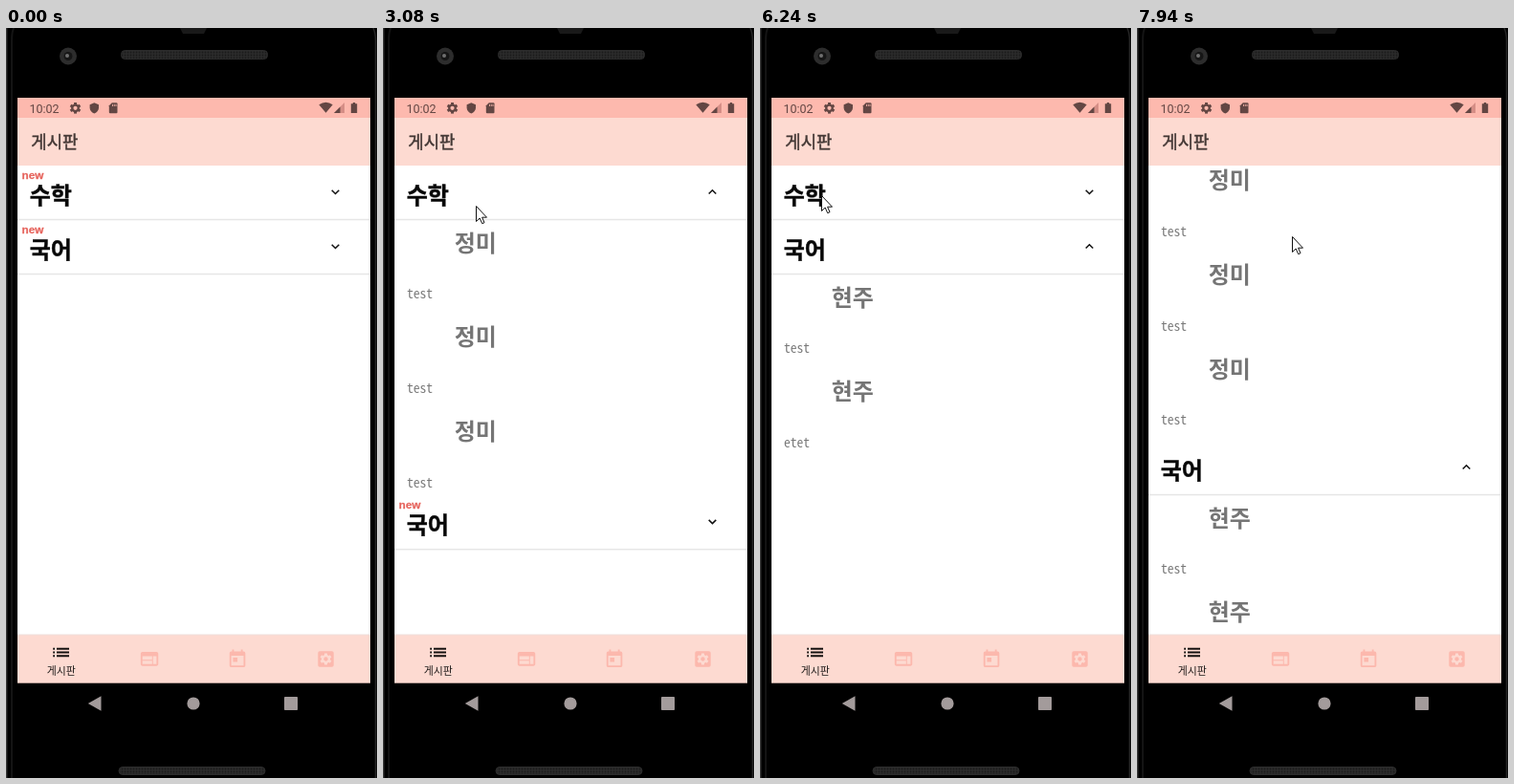
An HTML page that plays this animation: 388x785 px, repeating every 8000 ms.

```html
<!DOCTYPE html>
<html lang="ko">
<head>
<meta charset="utf-8">
<title>게시판</title>
<style>
  html, body { margin: 0; width: 100%; height: 100%; overflow: hidden; background: #000; }
  svg { display: block; width: 388px; height: 785px; }
  text { font-family: "Noto Sans CJK KR", "Noto Sans CJK", sans-serif; }
  .subject, .name { font-size: 24px; font-weight: 700; }
  .subject { fill: #080808; stroke: #080808; stroke-width: .4; stroke-linejoin: round; }
  .name { fill: #757575; }
  .body { font: 13.5px "Noto Sans Mono CJK KR", "Noto Sans Mono", monospace; fill: #787878; }
  .new { font: bold 11.7px "Liberation Sans", sans-serif; fill: #e6655e; stroke: #e6655e; stroke-width: .3; }
  .clock { font: 12.5px Roboto, sans-serif; fill: #634643; }
  .title { font-size: 17.8px; font-weight: 500; fill: #453936; stroke: #453936; stroke-width: .5; }
  .label { font-size: 10.9px; fill: #1c1817; }
  .chevron { fill: none; stroke: #111; stroke-width: 1.5; }
</style>
</head>
<body>
<svg viewBox="0 0 388 785">
  <defs>
    <pattern id="mesh" width="3" height="3" patternUnits="userSpaceOnUse">
      <rect width="3" height="3" fill="#2b2b2b"/><circle cx="1.5" cy="1.5" r=".9" fill="#1a1a1a"/>
    </pattern>
    <clipPath id="viewport"><rect x="12" y="144" width="369" height="491"/></clipPath>
    <clipPath id="clip0"><rect x="12" y="57" width="369" height="0"/></clipPath>
    <clipPath id="clip1"><rect x="12" y="57" width="369" height="0"/></clipPath>
  </defs>

  <!-- phone body -->
  <rect width="388" height="785" fill="#000"/>
  <g fill="none">
    <path d="M.7 0V785" stroke="#333" stroke-width="1.4"/>
    <path d="M8 0Q6 5 6 14V785" stroke="#141414" stroke-width="2"/>
    <path d="M384 0Q386.5 5 386.5 14V785" stroke="#242424" stroke-width="1.5"/>
  </g>
  <path d="M182 0H210L207 6H185Z" fill="#191919"/>
  <rect x="120.5" y="23.5" width="153" height="9" rx="4" fill="url(#mesh)" stroke="#2c2c2c"/>
  <rect x="118" y="773.5" width="153" height="8" rx="4" fill="url(#mesh)" stroke="#2c2c2c"/>
  <circle cx="65" cy="29.5" r="9" fill="#2d2d2d"/>
  <circle cx="65" cy="29.5" r="4.5" fill="#161616"/>
  <circle cx="64" cy="29" r="2" fill="#707070"/>

  <!-- list -->
  <rect x="12" y="144" width="369" height="491" fill="#fff"/>
  <g clip-path="url(#viewport)"><g id="list"></g></g>

  <!-- status and title bars -->
  <rect x="12" y="73" width="369" height="21" fill="#fdb9ae"/>
  <rect x="12" y="94" width="369" height="50" fill="#fddad1"/>
  <text class="clock" x="24.5" y="88.6">10:02</text>
  <text class="title" x="26.3" y="126.2">게시판</text>
  <g fill="#634643">
    <g id="statusGear"></g>
    <path d="M92.3 78.3L97 80.3V83.5Q96.8 87.5 92.3 89.5Q87.8 87.5 87.6 83.5V80.3Z"/>
    <path d="M110.8 78.3H115.5Q116.5 78.3 116.5 79.3V88.3Q116.5 89.3 115.5 89.3H108.8Q107.8 89.3 107.8 88.3V81.3Z"/>
    <path d="M111.5 79.8V82M113.3 79.8V82M115 79.8V82" stroke="#fdb9ae" stroke-width=".8"/>
    <path d="M327.3 80.3Q334.5 75.3 341.7 80.3L334.5 88.8Z"/>
    <path d="M354 78V89H343Z" fill="#d58e86"/>
    <path d="M349.5 82.5V89H343Z"/>
    <path d="M362.8 78H365.2V79.2H367.2V89H360.8V79.2H362.8Z"/>
  </g>

  <!-- bottom bar -->
  <rect x="12" y="635" width="369" height="50.7" fill="#fddad1"/>
  <rect x="12" y="634.5" width="369" height="1" fill="#f0e2de"/>
  <path d="M49.2 649.8h1.8m2 0h13m-16.8 3.7h1.8m2 0h13m-16.8 3.7h1.8m2 0h13" stroke="#15100f" stroke-width="1.9"/>
  <text class="label" x="42.7" y="676.5">게시판</text>
  <g fill="#fcb8ad">
    <path transform="translate(139 649.3) scale(.92)" d="M20 4H4c-1.1 0-2 .9-2 2V18c0 1.1.9 2 2 2h16c1.1 0 2-.9 2-2V6c0-1.1-.9-2-2-2zm-5 14H4v-4h11v4zm0-5H4V9h11v4zm5 5h-4V9h4v9z"/>
    <path transform="translate(231 649.7) scale(.92)" d="M19 3h-1V1h-2v2H8V1H6v2H5c-1.1 0-2 .9-2 2V19c0 1.1.9 2 2 2h14c1.1 0 2-.9 2-2V5c0-1.1-.9-2-2-2zm0 16H5V8h14v11zM7 10h5v5H7z"/>
    <rect x="326.3" y="652.3" width="16.4" height="16.4" rx="1.8"/>
    <g id="navGear"></g>
  </g>

  <!-- system buttons -->
  <g fill="#a39b9b">
    <path d="M85.8 707L99.5 699.3V714.7Z"/>
    <circle cx="196" cy="707" r="6.6"/>
    <rect x="291" y="700" width="14" height="14" rx=".8"/>
  </g>

  <g id="pointer">
    <path d="M.5 .5V16.5L4.2 13L6.7 18.7L9 17.7L6.6 12.2H11.5Z" fill="#fff" stroke="#111"/>
    <circle id="press" r="15" fill="#ffff80" style="mix-blend-mode:multiply"/>
  </g>
</svg>
<script>
const LOOP = 8000, TICK = 77;
const HEADER = 57, ITEM = 98.75, TOP = 144;
const PRESS = 230, UNFOLD_DELAY = 80, UNFOLD = 329;
const DRAG = { start: 7362, end: 7931, scroll: 164 };
const $ = id => document.getElementById(id);

const gear = (x, y, r, color, hole) => `
  <g transform="translate(${x} ${y})" fill="${color}">
    ${[0, 60, 120].map(a => `<rect x="${-r * .25}" y="${-r}" width="${r * .5}" height="${2 * r}" transform="rotate(${a})"/>`).join('')}
    <circle r="${r * .76}"/><circle r="${r * .36}" fill="${hole}"/>
  </g>`;
$('statusGear').innerHTML = gear(72.5, 83.8, 5.8, '#634643', '#fdb9ae');
$('navGear').innerHTML = gear(334.5, 660.5, 6, '#fddad1', '#fcb8ad');

// Each section opens or closes at its toggle times.
const sections = [
  { subject: '수학', author: '정미', posts: ['test', 'test', 'test', 'test'], toggles: [2760, 4230, 6480] },
  { subject: '국어', author: '현주', posts: ['test', 'etet'], toggles: [5180] },
];
$('list').innerHTML = sections.map(({ subject, author, posts }, i) => `
  <g id="section${i}">
    <text class="new" id="new${i}" x="16.5" y="13.7">new</text>
    <text class="subject" x="24.7" y="39.6">${subject}</text>
    <path class="chevron" id="chevron${i}"/>
    <rect x="12" y="55.8" width="369" height="1.5" fill="#e6e6e6"/>
    <g clip-path="url(#clip${i})">${posts.map((post, k) => `
      <g transform="translate(0 ${HEADER + k * ITEM})">
        <text class="name" x="74.7" y="32.6">${author}</text>
        <text class="body" x="25" y="82">${post}</text>
      </g>`).join('')}
    </g>
  </g>`).join('');

// The pointer rests between moves.
const entry = { x: 289, y: 655 };
const moves = [
  { start: 290, end: 520, x: 264, y: 401 },
  { start: 755, end: 1080, x: 76, y: 240 },
  { start: 1080, end: 1300, x: 167, y: 222 },
  { start: 1685, end: 2160, x: 98, y: 181 },
  { start: 2690, end: 2840, x: 97, y: 186 },
  { start: 3690, end: 4000, x: 98, y: 180 },
  { start: 4620, end: 4928, x: 78, y: 270 },
  { start: 4928, end: 5005, x: 62, y: 236 },
  { start: 5950, end: 6237, x: 64, y: 175 },
  { start: 6800, end: 7260, x: 143, y: 451 },
  { start: DRAG.start, end: DRAG.end, x: 162, y: 218 },
];

const ramp = (t, start, end) => Math.min(1, Math.max(0, (t - start) / (end - start)));
const show = (id, visible) => $(id).setAttribute('visibility', visible ? 'visible' : 'hidden');
const place = (id, x, y) => $(id).setAttribute('transform', `translate(${x} ${y})`);

function pointerAt(t) {
  return moves.reduce((from, to) => {
    const p = ramp(t, to.start, to.end);
    return { x: from.x + (to.x - from.x) * p, y: from.y + (to.y - from.y) * p };
  }, entry);
}

function unfolded(toggles, t) {
  return toggles.reduce((sum, time, i) => {
    const start = time + UNFOLD_DELAY;
    return sum + (i % 2 ? -1 : 1) * ramp(t, start, start + UNFOLD);
  }, 0);
}

function draw(t) {
  let y = TOP - DRAG.scroll * ramp(t, DRAG.start, DRAG.end);
  sections.forEach(({ posts, toggles }, i) => {
    const height = posts.length * ITEM * unfolded(toggles, t);
    const toggled = toggles.filter(time => time <= t).length;
    place('section' + i, 0, y);
    $('clip' + i).firstElementChild.setAttribute('height', height);
    show('new' + i, !toggled);
    $('chevron' + i).setAttribute('d', toggled % 2
      ? 'M340.7 29.5l3.8-3.8 3.8 3.8' : 'M340.7 25.7l3.8 3.8 3.8-3.8');
    y += HEADER + height;
  });

  const pointer = pointerAt(t);
  place('pointer', Math.round(pointer.x), Math.round(pointer.y));
  $('pointer').style.display = t > moves[0].start ? '' : 'none';
  const tapping = sections.some(s => s.toggles.some(time => t >= time - PRESS && t < time));
  const dragging = t >= DRAG.start && t < DRAG.start + 1.5 * PRESS;
  show('press', tapping || dragging);
}

function frame() {
  const t = performance.now() % LOOP;
  draw(Math.floor(t / TICK) * TICK);
  requestAnimationFrame(frame);
}
frame();
</script>
</body>
</html>
```
